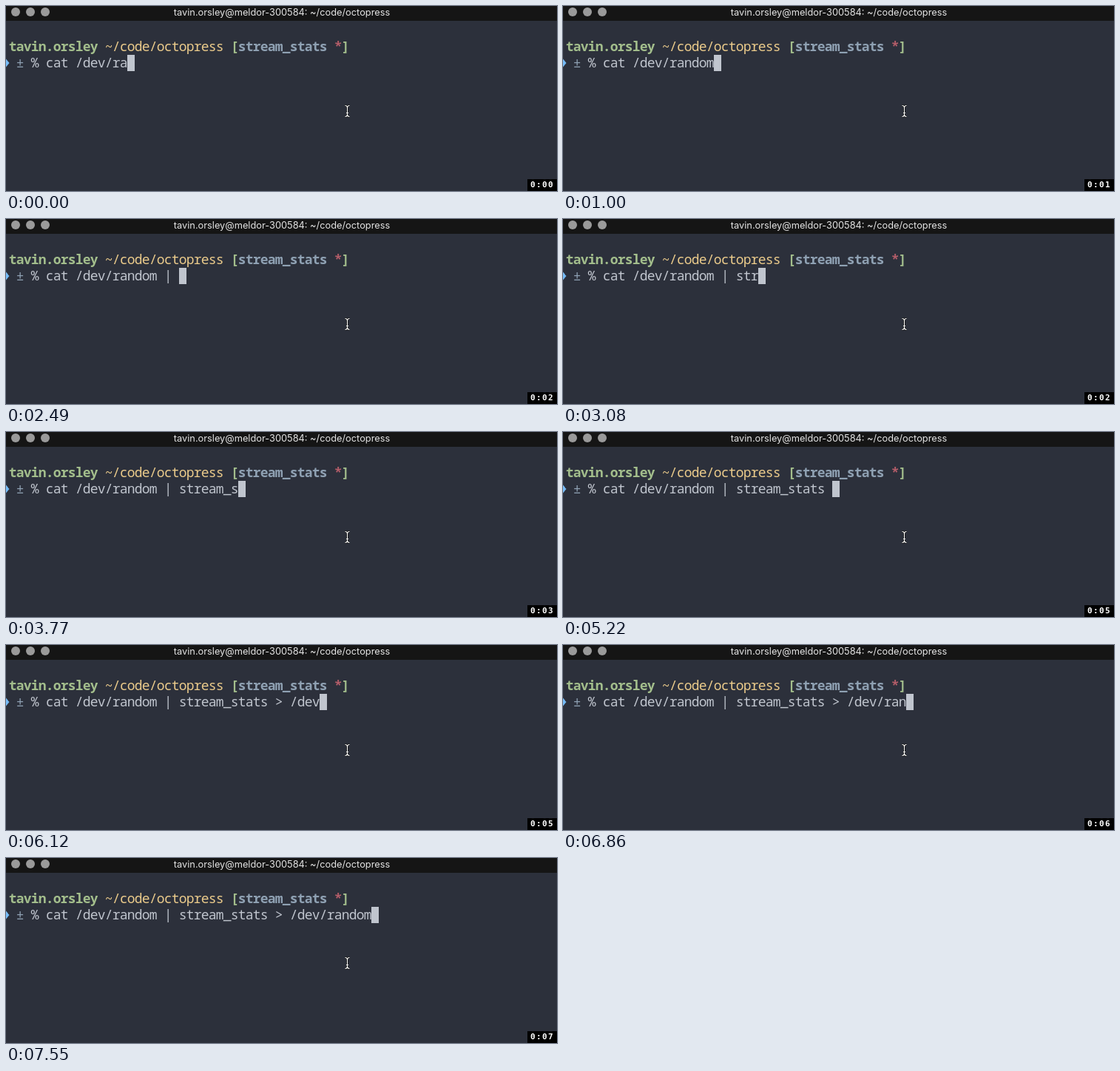
Animation, 745 px wide and 250 px high, one loop 8 s. Source, as an HTML page:

```html
<!DOCTYPE html>
<html lang="en">
<head>
<meta charset="utf-8">
<title>Terminal</title>
<style>
  html, body { margin: 0; width: 100%; height: 100%; overflow: hidden; background: #2c303b; }
  body { position: relative; }
  body > * { position: absolute; }
  #bar { left: 0; top: 0; width: 745px; height: 20px; background: #151515; }
  #title {
    left: 0; width: 746px; top: 0; text-align: center; white-space: pre;
    font: 12.8px/17px Inter, sans-serif; color: #e4e4e4;
  }
  .row {
    left: 3.8px; white-space: pre; color: #c0c5ce;
    font: 500 18px/22px "Noto Sans Mono", monospace; letter-spacing: calc(10px - 1ch);
  }
  .green { color: #a3be8c; }
  .path { color: #ebcb8b; }
  .blue { color: #8fa1b3; }
  .red { color: #b55d69; }
  #cursor { top: 66px; width: 10px; height: 22px; background: #c0c5ce; }
  #clock {
    left: 705px; top: 234px; width: 36px; height: 16px; padding-left: 4px;
    background: #000; color: #fff; white-space: pre;
    font: bold 11px/15px "DejaVu Sans Mono", monospace; letter-spacing: calc(8px - 1ch);
  }
</style>
</head>
<body>
<div id="bar"></div>
<div id="title">tavin.orsley@meldor-300584: ~/code/octopress</div>
<div class="row" style="top:43px"><b class="green">tavin.orsley</b> <span class="path">~/code/octopress</span> <b class="green">[</b><b class="blue">stream_stats</b> <b class="red">*</b><b class="green">]</b></div>
<div class="row" style="top:65px"> <span class="blue">±</span> % <span id="typed"></span></div>
<div id="cursor"></div>
<svg width="745" height="250" style="left:0;top:0">
  <g fill="#9a9a9a">
    <circle cx="13" cy="8" r="6"/><circle cx="33" cy="8" r="6"/><circle cx="53" cy="8" r="6"/>
  </g>
  <path d="M0 71.5L4.5 77L0 82.5Z" fill="#76bcf8"/>
  <defs>
    <path id="beam" d="M458.5 134.5q3 0 3 3v9q0 3-3 3M464.5 134.5q-3 0-3 3v9q0 3 3 3M460 144.5h3"/>
  </defs>
  <g fill="none">
    <use href="#beam" stroke="#111" stroke-width="2.6"/>
    <use href="#beam" stroke="#fff" stroke-width="1.1"/>
  </g>
</svg>
<div id="clock"></div>
<script>
const DURATION = 8000;
const COMMAND = "cat /dev/random | stream_stats > /dev/random";

// Typing runs at an even pace between these points: [ms, characters typed].
const pace = [
  [0, 11], [300, 13], [900, 15], [2490, 18], [2780, 19], [3770, 26],
  [4620, 31], [5220, 31], [5520, 33], [6120, 37], [6860, 41], [7550, 44], [DURATION, 44]
];

const [typed, cursor, clock] = ["typed", "cursor", "clock"].map(id => document.getElementById(id));

function typedLength(t) {
  const next = pace.findIndex(([time]) => time > t);
  const [t0, n0] = pace[next - 1];
  const [t1, n1] = pace[next];
  return n0 + Math.floor((n1 - n0) * (t - t0) / (t1 - t0));
}

function render(now) {
  const t = now % DURATION;
  const length = typedLength(t);
  typed.textContent = COMMAND.slice(0, length);
  cursor.style.left = 54 + 10 * length + "px";
  clock.textContent = "0:0" + Math.floor((t + 60) / 1055);
}

const start = performance.now();
function tick() {
  render(performance.now() - start);
  requestAnimationFrame(tick);
}
tick();
</script>
</body>
</html>
```
